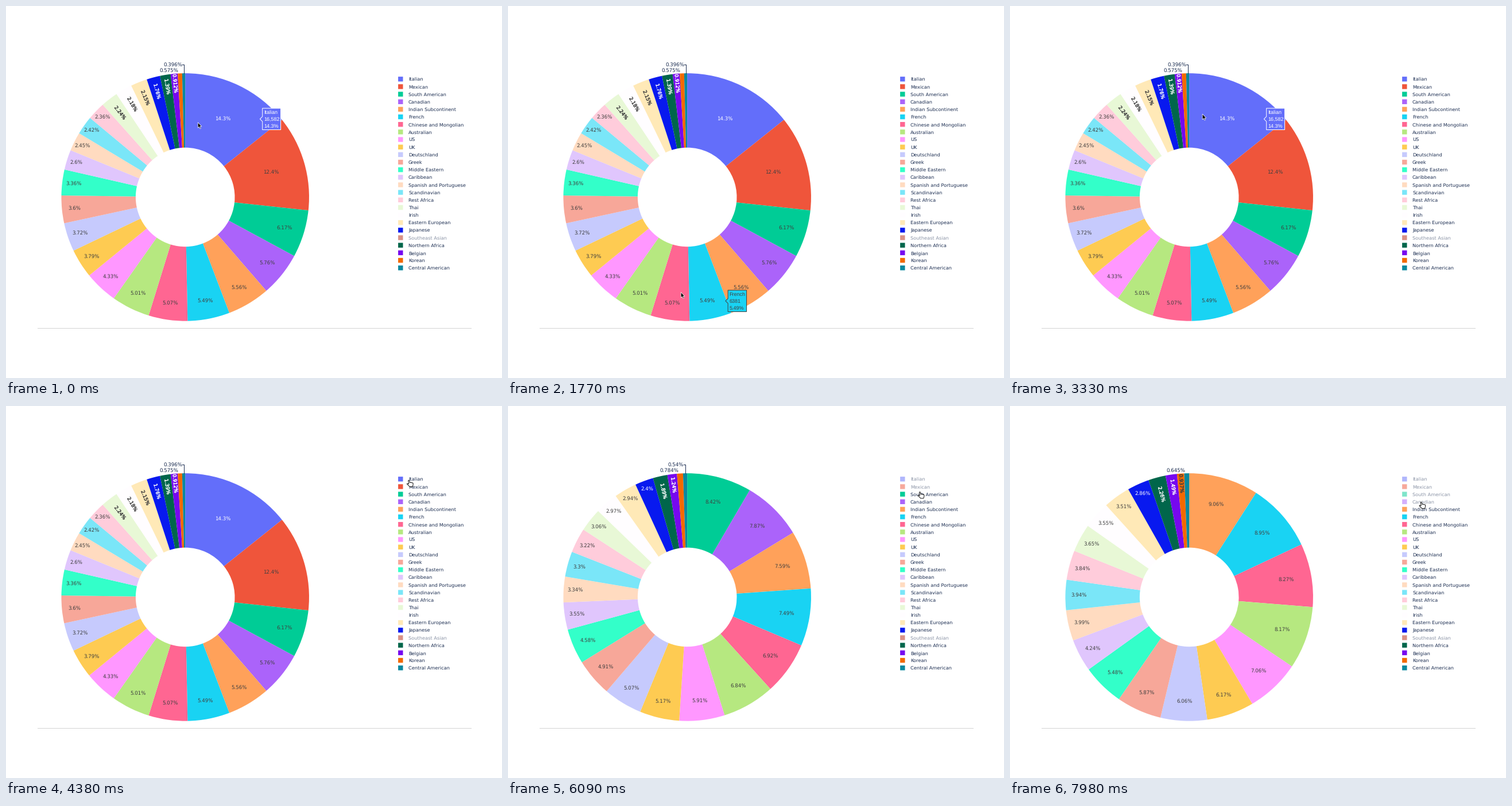
These frames come from a looping animation (864 px wide and 648 px high, 8000 ms). A matplotlib script:

```python
import colorsys
import math

import numpy as np
import matplotlib.pyplot as plt
from matplotlib.animation import FuncAnimation
from matplotlib.colors import to_rgb
from matplotlib.patches import Circle, Polygon, Rectangle, Wedge
from matplotlib.patheffects import withStroke

plt.rcParams["font.family"] = "DejaVu Sans"
plt.rcParams["text.hinting"] = "none"

WIDTH, HEIGHT = 864, 648
INTERVAL, FRAMES = 40, 200
CX, CY, R, RING = 312.2, 332.95, 215.75, 0.6
TEXT_HEIGHT = 10.1
NAVY, GRAY = "#1a2c50", "#404040"

CUISINES = [
    ("Italian", 16582), ("Mexican", 14463), ("South American", 7176),
    ("Canadian", 6700), ("Indian Subcontinent", 6464), ("French", 6381),
    ("Chinese and Mongolian", 5896), ("Australian", 5823), ("US", 5031),
    ("UK", 4401), ("Deutschland", 4323), ("Greek", 4185),
    ("Middle Eastern", 3905), ("Caribbean", 3026),
    ("Spanish and Portuguese", 2844), ("Scandinavian", 2811),
    ("Rest Africa", 2740), ("Thai", 2605), ("Irish", 2532),
    ("Eastern European", 2503), ("Japanese", 2041), ("Southeast Asian", 1940),
    ("Northern Africa", 1611), ("Belgian", 1060), ("Korean", 668),
    ("Central American", 460),
]
ALWAYS_HIDDEN = 21
WHITE_TEXT = {0, 20, 22, 23}

CLICKS = [4600, 5480, 6350, 7250]
PRESS_TIME, REDRAW_DELAY, HOVER_LAG = 190, 240, 75


def shade(color, amount):
    h, l, s = colorsys.rgb_to_hls(*to_rgb(color))
    return colorsys.hls_to_rgb(h, min(1, max(0, l + amount)), s)


BASE = ["#636efa", "#ef553b", "#00cc96", "#ab63fa", "#ffa15a",
        "#19d3f3", "#ff6692", "#b6e880", "#ff97ff", "#fecb52"]
COLORS = [shade(c, d) for d in (0, 0.2, -0.2) for c in BASE]

fig = plt.figure(figsize=(WIDTH / 72, HEIGHT / 72), dpi=72, facecolor="white")
ax = fig.add_axes([0, 0, 1, 1])
ax.set(xlim=(0, WIDTH), ylim=(HEIGHT, 0))
ax.axis("off")


def polar(radius, angle):
    """Point at an angle in radians, clockwise from the top."""
    return CX + radius * math.sin(angle), CY - radius * math.cos(angle)


def inscribed(half):
    return min(1 / (1 + 1 / math.sin(half)), RING / 2)


def slices(hidden):
    """Yield index, share, start and stop angle of every visible slice."""
    shown = [i for i in range(hidden, len(CUISINES)) if i != ALWAYS_HIDDEN]
    total = sum(CUISINES[i][1] for i in shown)
    start = 0
    for i in shown:
        share = CUISINES[i][1] / total
        stop = start + share * 2 * math.pi
        yield i, share, start, stop
        start = stop


def percent(share):
    return f"{share * 100:.3g}%"


def place_label(text, start, stop):
    """Return x, y, rotation of a label that fits inside, or None."""
    half, mid = (stop - start) / 2, (start + stop) / 2
    width = 8.65 * (0.636 * (len(text) - 2) + 1.268)
    r_in = inscribed(half)
    if 2 * R * r_in >= math.hypot(width, TEXT_HEIGHT):
        return *polar(R * (1 - r_in), mid), 0
    aspect = width / TEXT_HEIGHT
    q = aspect + 1 / (2 * math.tan(half))
    s = min(1 / (math.sqrt(q * q + 0.5) + q),
            RING / (math.sqrt(aspect ** 2 + RING / 2) + aspect))
    if 2 * s * (R - 4.3) < TEXT_HEIGHT:
        return None
    return *polar(R * (math.cos(s) - aspect * s), mid), -90 - math.degrees(mid)


def build_chart(hidden):
    artists, outside = [], 0
    for i, share, start, stop in slices(hidden):
        artists.append(ax.add_patch(Wedge(
            (CX, CY), R, math.degrees(start) - 90, math.degrees(stop) - 90,
            width=R * RING, facecolor=COLORS[i], linewidth=0)))
        text = percent(share)
        spot = place_label(text, start, stop)
        if spot:
            x, y, rotation = spot
            ink = "white" if i in WHITE_TEXT else GRAY
            label = ax.text(x, y, text, size=8.65, ha="center", va="center",
                            rotation=rotation, rotation_mode="anchor",
                            color=ink)
            if rotation:
                # Thin strokes fade when turned, so thicken them a little.
                label.set_path_effects(
                    [withStroke(linewidth=0.35, foreground=ink)])
            artists.append(label)
            continue
        px, py = polar(R, (start + stop) / 2)
        y = CY - R - TEXT_HEIGHT / 2 + 0.6 - outside * (TEXT_HEIGHT + 0.3)
        artists.append(ax.text(px - TEXT_HEIGHT / 4, y, text, size=8.65,
                               ha="right", va="center", color=NAVY))
        if outside:
            artists += ax.plot([px, px, px - TEXT_HEIGHT / 4], [py, y, y],
                               color=NAVY, lw=1)
        outside += 1
    return artists


charts = [build_chart(n) for n in range(len(CLICKS) + 1)]
regions = list(slices(0))

ax.plot([54.5, 809.5], [560.5, 560.5], color="#d3d3d3", lw=1)
legend = []
for i, (name, _) in enumerate(CUISINES):
    y = 127.3 + 13.156 * i
    swatch = ax.add_patch(Rectangle((683.1, y - 4.2), 8.4, 8.4, snap=False,
                                    facecolor=COLORS[i], linewidth=0))
    legend.append((swatch, ax.text(701, y + 3, name, size=8.3, color=NAVY)))

hover_box = ax.add_patch(Polygon([(0, 0)] * 3, closed=True, lw=1, zorder=5,
                                 joinstyle="miter"))
hover_lines = [ax.text(0, 0, "", size=9.05, family="Liberation Sans", zorder=6)
               for _ in range(3)]

ARROW = np.array([(0, 0), (0, 9.6), (2.2, 7.6), (3.7, 11), (5.2, 10.4),
                  (3.7, 7), (6.7, 7)])
HAND = np.array([(-0.3, 0.8), (0.7, 0.2), (1.7, 0.9), (2.2, 4.4), (3.4, 3.8),
                 (4.5, 4.6), (5.6, 4.2), (6.5, 5), (7.6, 4.9), (8.2, 5.9),
                 (8, 8.6), (7, 11.5), (2.2, 11.5), (-2.4, 7), (-2.2, 5.8),
                 (0.6, 7)])
pointer = ax.add_patch(Polygon(ARROW, closed=True, fc="black", ec="white",
                               lw=0.7, zorder=9))
hand = ax.add_patch(Polygon(HAND, closed=True, fc="white", ec="black",
                            lw=0.9, zorder=9))
ring = ax.add_patch(Circle((0, 0), 21, fill=False, ec="black", lw=1, zorder=8))

SWEEP = ([480, 1760, 2680, 3180], [9.6, 183.8, 299, 362], [132, 166, 150, 142])
STOPS = [(3180, 4250, 701, 129), (5080, 5400, 714, 139),
         (5850, 6250, 718.5, 156), (6850, 7180, 715.5, 167)]


def cursor_at(t):
    times, angles, radii = SWEEP
    angle = math.radians(np.interp(t, times, angles))
    x, y = polar(np.interp(t, times, radii), angle)
    for begin, end, tx, ty in STOPS:
        p = min(1, max(0, (t - begin) / (end - begin)))
        p = p * p * (3 - 2 * p)
        x, y = x + (tx - x) * p, y + (ty - y) * p
    return x, y


def slice_under(x, y):
    if not R * (1 - RING) <= math.hypot(x - CX, y - CY) <= R:
        return None
    angle = math.atan2(x - CX, CY - y) % (2 * math.pi)
    return next((s for s in regions if s[2] <= angle < s[3]), None)


def draw_hover(region):
    for artist in (hover_box, *hover_lines):
        artist.set_visible(region is not None)
    if region is None:
        return
    i, share, start, stop = region
    name, count = CUISINES[i]
    ink = "white" if i in WHITE_TEXT else GRAY
    r_in = inscribed((stop - start) / 2)
    x, y = polar(R * (1 - r_in), (start + stop) / 2)
    side = 1 if x >= CX else -1
    x += side * r_in * R

    number = f"{count:,}" if count > 9999 else str(count)
    for line, text in zip(hover_lines, (name, number, percent(share))):
        line.set(text=text, color=ink)
    renderer = fig.canvas.get_renderer()
    width = 4.4 + max(line.get_window_extent(renderer).width
                      for line in hover_lines)
    near, far = x + side * 4.3, x + side * (4.3 + width)
    hover_box.set_xy([(x, y), (near, y - 4.3), (near, y - 18.7),
                      (far, y - 18.7), (far, y + 18.7), (near, y + 18.7),
                      (near, y + 4.3)])
    hover_box.set(facecolor=COLORS[i], edgecolor=ink)
    for k, line in enumerate(hover_lines):
        line.set_position((min(near, far) + 2.2, y + 12 * (k - 1) + 3.3))


def update(frame):
    t = frame * INTERVAL
    hidden = sum(t >= c + REDRAW_DELAY for c in CLICKS)
    for n, chart in enumerate(charts):
        for artist in chart:
            artist.set_visible(n == hidden)
    for i, row in enumerate(legend):
        for artist in row:
            artist.set_alpha(0.5 if i < hidden or i == ALWAYS_HIDDEN else 1)

    draw_hover(slice_under(*cursor_at(t - HOVER_LAG)))

    x, y = cursor_at(t)
    over_legend = x > 683
    pointer.set_xy(ARROW + (x, y))
    hand.set_xy(HAND + (x, y))
    pointer.set_visible(not over_legend)
    hand.set_visible(over_legend)
    ring.center = x, y
    ring.set_visible(any(c <= t < c + PRESS_TIME for c in CLICKS))
    return []


anim = FuncAnimation(fig, update, frames=FRAMES, interval=INTERVAL,
                     repeat=True, repeat_delay=0, blit=False)
plt.show()
```
